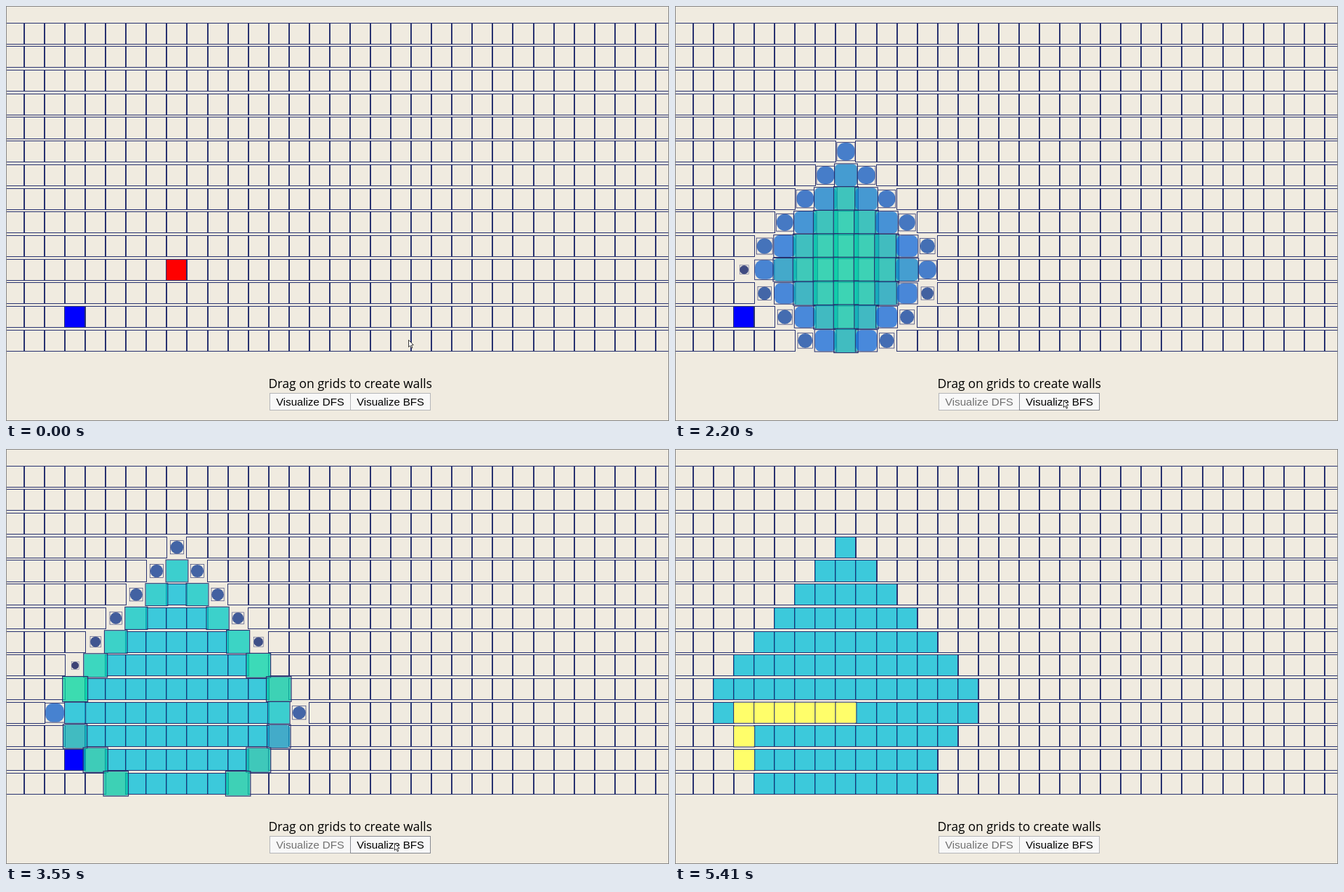
Write an HTML page with a canvas that moves like this. It is 946 by 592 pixels and loops after 5.51 s.

```html
<!DOCTYPE html>
<html lang="en">
<head>
<meta charset="utf-8">
<title>Grid search</title>
<style>
  html, body { margin: 0; width: 100%; height: 100%; overflow: hidden; background: #f0ebe0; }
  canvas { display: block; width: 946px; height: 592px; }
</style>
</head>
<body>
<canvas id="stage" width="946" height="592"></canvas>
<script>
const ctx = document.getElementById('stage').getContext('2d');
const W = 946, H = 592, LOOP = 5510;
const COLS = 34, ROWS = 14, SIZE = 29.06, ROW_PITCH = 33.71, LEFT = -3.06, TOP = 24.6;
const PAPER = '#f0ebe0', LINE = '#26306f', YELLOW = 'rgb(255,254,106)';
const SOURCE = { col: 8, row: 10 }, TARGET = { col: 3, row: 12 };
const SEARCH_START = 1175, STEP = 5, PATH_START = 4010, GROW = 1500;

// The picture is refreshed at these moments and held in between.
const ticks = [0, 130, 250, 390, 510, 630, 790, 1220, 1350, 1490, 1640, 1760, 1920, 2050,
  2200, 2330, 2470, 2600, 2720, 2870, 3010, 3160, 3280, 3430, 3550, 3670, 3820, 3960,
  4080, 4220, 4370, 4490, 4620, 4780, 4990, 5140, 5280, 5410];

const clamp = (v, lo, hi) => Math.min(hi, Math.max(lo, v));
const mix = (a, b, k) => a + (b - a) * k;
const keyOf = (col, row) => row * COLS + col;

// cubic-bezier(0, 0, .58, 1)
function easeOut(x) {
  x = clamp(x, 0, 1);
  let lo = 0, hi = 1;
  for (let i = 0; i < 24; i++) {
    const s = (lo + hi) / 2;
    if (1.74 * s * s - 0.74 * s ** 3 < x) lo = s; else hi = s;
  }
  return 3 * lo * lo - 2 * lo ** 3;
}

// Breadth-first search that marks cells only when they leave the queue,
// so repeated entries slow the outer rings down.
function searchTimes() {
  const times = new Map(), queue = [SOURCE];
  for (let i = 0; i < queue.length; i++) {
    const { col, row } = queue[i], key = keyOf(col, row);
    if (col === TARGET.col && row === TARGET.row) break;
    if (!times.has(key)) times.set(key, SEARCH_START + i * STEP);
    for (const [dx, dy] of [[0, -1], [0, 1], [-1, 0], [1, 0]]) {
      const c = col + dx, r = row + dy;
      if (c >= 0 && c < COLS && r >= 0 && r < ROWS && !times.has(keyOf(c, r))) {
        queue.push({ col: c, row: r });
      }
    }
  }
  return times;
}

function pathTimes() {
  const times = new Map();
  let time = PATH_START;
  const add = (col, row) => { times.set(keyOf(col, row), time); time += STEP; };
  for (let col = SOURCE.col; col >= TARGET.col; col--) add(col, SOURCE.row);
  for (let row = SOURCE.row + 1; row <= TARGET.row; row++) add(TARGET.col, row);
  return times;
}

const visits = searchTimes(), path = pathTimes();

const visitColors = [
  [0, [0, 0, 66]], [0.5, [17, 104, 217]], [0.75, [0, 217, 159]], [1, [0, 190, 218]]
];

function visitColor(p) {
  let i = 0;
  while (i < 2 && p >= visitColors[i + 1][0]) i++;
  const [from, a] = visitColors[i], [to, b] = visitColors[i + 1];
  const k = easeOut((p - from) / (to - from));
  return `rgba(${a.map((v, n) => mix(v, b[n], k)).join(',')},.75)`;
}

// Scale that rises to 1.2 at the peak and settles at 1.
function pulse(p, first, peak) {
  return p < peak
    ? mix(first, 1.2, easeOut(p / peak))
    : mix(1.2, 1, easeOut((p - peak) / (1 - peak)));
}

function cellState(col, row, clock) {
  const key = keyOf(col, row);
  if (clock >= path.get(key)) {
    const p = (clock - path.get(key)) / GROW;
    return p < 1
      ? { fill: YELLOW, scale: pulse(p, 0.6, 0.5), radius: 0, moving: true }
      : { fill: YELLOW };
  }
  if (clock >= visits.get(key)) {
    const p = (clock - visits.get(key)) / GROW;
    if (p >= 1) return { fill: visitColor(1) };
    return {
      fill: visitColor(p), scale: pulse(p, 0.3, 0.75), moving: true,
      radius: Math.min(0.5, 1 - easeOut(p * 1.15))
    };
  }
  if (key === keyOf(SOURCE.col, SOURCE.row)) return { fill: '#f00' };
  if (key === keyOf(TARGET.col, TARGET.row)) return { fill: '#00f' };
  return {};
}

function drawStill(col, row, fill) {
  const x = Math.round(LEFT + col * SIZE), right = Math.round(LEFT + (col + 1) * SIZE);
  const y = Math.round(TOP + row * ROW_PITCH), bottom = Math.round(TOP + row * ROW_PITCH + SIZE);
  if (fill) {
    ctx.fillStyle = fill;
    ctx.fillRect(x, y, right - x, bottom - y);
  }
  ctx.lineWidth = 1;
  ctx.strokeStyle = LINE;
  ctx.strokeRect(x - 0.5, y - 0.5, right - x + 1, bottom - y + 1);
}

function drawMoving(col, row, { fill, scale, radius }) {
  const half = SIZE / 2;
  ctx.save();
  ctx.translate(LEFT + col * SIZE + half, TOP + row * ROW_PITCH + half);
  ctx.scale(scale, scale);
  ctx.fillStyle = fill;
  ctx.beginPath();
  ctx.roundRect(-half, -half, SIZE, SIZE, radius * SIZE);
  ctx.fill();
  ctx.lineWidth = 1;
  ctx.strokeStyle = LINE;
  ctx.strokeRect(-half - 0.5, -half - 0.5, SIZE + 1, SIZE + 1);
  ctx.restore();
}

function drawGrid(clock) {
  const moving = [];
  for (let row = 0; row < ROWS; row++) {
    for (let col = 0; col < COLS; col++) {
      const state = cellState(col, row, clock);
      if (state.moving) moving.push([col, row, state]);
      else drawStill(col, row, state.fill);
    }
  }
  moving.forEach(cell => drawMoving(...cell));
}

function drawButton(x, width, label, { disabled, hover }) {
  ctx.fillStyle = '#f8f8f8';
  ctx.fillRect(x, 552, width, 25);
  ctx.lineWidth = 1;
  ctx.strokeStyle = hover ? '#85888f' : '#b4b5b8';
  ctx.strokeRect(x + 0.5, 552.5, width - 1, 24);
  ctx.fillStyle = disabled ? '#707070' : '#000';
  ctx.font = '15.5px "Liberation Sans", Arial, sans-serif';
  ctx.fillText(label, x + width / 2, 569.5);
}

function drawControls(t) {
  ctx.textAlign = 'center';
  ctx.fillStyle = '#000';
  ctx.font = '17.7px "Open Sans", "Noto Sans", sans-serif';
  ctx.fillText('Drag on grids to create walls', 491.2, 544.5);
  drawButton(376, 116, 'Visualize DFS', { disabled: t >= 1220 });
  drawButton(491, 115, 'Visualize BFS', { hover: t >= 510 && t < 4780 });
}

function drawCursor(t) {
  if (t >= 4490) return;
  const stops = [[0, 574, 476], [130, 569, 497], [250, 555, 525], [390, 554, 547], [510, 554, 562]];
  const [, x, y] = stops.filter(stop => stop[0] <= t).pop();
  ctx.save();
  ctx.translate(x + 0.5, y + 0.5);
  ctx.beginPath();
  [[0, 0], [0, 10], [2.3, 8], [4, 11.7], [5.5, 11], [4, 7.4], [6.8, 7]]
    .forEach(point => ctx.lineTo(...point));
  ctx.closePath();
  ctx.fillStyle = '#fff';
  ctx.fill();
  ctx.lineWidth = 0.9;
  ctx.strokeStyle = '#222';
  ctx.stroke();
  ctx.restore();
}

function render(now) {
  const loopTime = now % LOOP;
  const t = ticks.filter(tick => tick <= loopTime).pop();
  const clock = t + clamp((t - 2000) / 50, 0, 40);
  ctx.fillStyle = PAPER;
  ctx.fillRect(0, 0, W, H);
  drawGrid(clock);
  drawControls(t);
  drawCursor(t);
  ctx.lineWidth = 1;
  ctx.strokeStyle = '#858585';
  ctx.strokeRect(0.5, 0.5, W - 1, H - 1);
}

const begin = performance.now();
function loop() {
  render(performance.now() - begin);
  requestAnimationFrame(loop);
}
loop();
</script>
</body>
</html>
```
